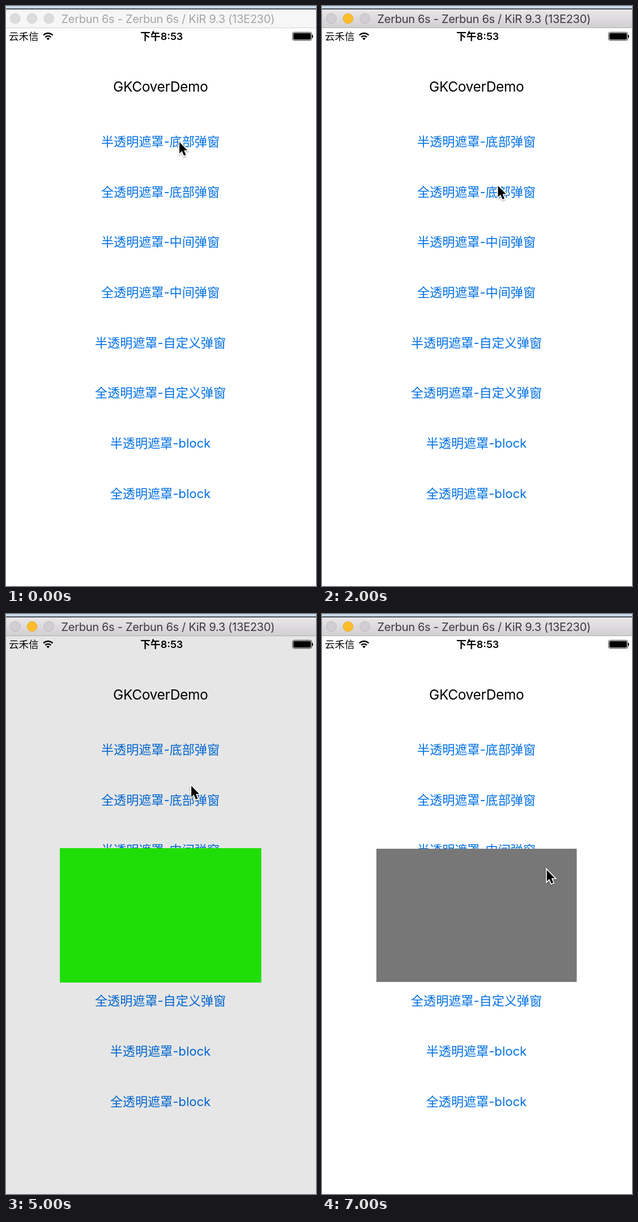
These frames come from a looping animation (547 by 1023 pixels, 8000 ms). An HTML page:

```html
<!DOCTYPE html>
<html lang="zh-CN">
<head>
<meta charset="utf-8">
<title>GKCoverDemo</title>
<style>
  html, body { margin: 0; width: 100%; height: 100%; overflow: hidden; background: #fff; }
  svg { display: block; }
  text { font-family: Inter, "Noto Sans CJK SC", "Noto Sans CJK JP", sans-serif; }
  .links { font-size: 22.1px; fill: #0070e6; text-anchor: middle; }
  .heading { font-size: 24.4px; letter-spacing: -.012em; text-anchor: middle; }
  .status { font-size: 17.5px; }
  .clock { font-size: 17.9px; font-weight: 600; text-anchor: middle; }
  .caption { font-size: 20px; letter-spacing: -.015em; }
</style>
</head>
<body>
<svg width="547" height="1023" viewBox="0 0 547 1023">
  <defs>
    <linearGradient id="chrome" x2="0" y2="1">
      <stop stop-color="#e9e7e9"/><stop offset="1" stop-color="#d1cfd1"/>
    </linearGradient>
    <filter id="shadow" x="-50%" y="-50%" width="200%" height="200%">
      <feDropShadow dx="0" dy="1.5" stdDeviation="1.2" flood-opacity=".35"/>
    </filter>
  </defs>

  <rect width="547" height="1023" fill="#fff"/>
  <g class="status">
    <text x="5" y="60">云禾信</text>
    <text class="clock" x="274.6" y="60">下午8:53</text>
  </g>
  <g fill="none" stroke="#000" stroke-width="2.4">
    <path d="M66 51.5a11.5 11.5 0 0 1 16.4 0M69.2 55a7 7 0 0 1 10 0"/>
    <path d="M74.2 60.3l-2.8-3a4 4 0 0 1 5.6 0z" fill="#000" stroke="none"/>
  </g>
  <rect x="505.5" y="46.3" width="34" height="14.4" rx="3" fill="none" stroke="#000" stroke-width=".8"/>
  <rect x="507" y="47.8" width="31" height="11.4" rx="1.8"/>
  <path d="M540.5 51q2 2.6 0 5.2z" stroke="#000"/>
  <text class="heading" x="272.7" y="151">GKCoverDemo</text>
  <g class="links" id="links"></g>

  <rect id="cover" y="39" width="547" height="984"/>
  <rect id="popup"/>

  <rect width="547" height="5" fill="#c8daec"/>
  <rect y="4.5" width="547" height="1.5" fill="#20262c"/>
  <rect id="bar" y="6" width="547" height="32"/>
  <rect id="edge" y="38" width="547" height="1"/>
  <g id="lights">
    <circle cx="16.3" cy="22" r="8.8"/>
    <circle cx="46" cy="22" r="8.8"/>
    <circle cx="75.7" cy="22" r="8.8"/>
  </g>
  <text class="caption" id="caption" x="97.5" y="29.5">Zerbun 6s - Zerbun 6s / KiR 9.3 (13E230)</text>

  <path id="cursor" d="M0 0V20L4.5 15.8L8 24L11.4 22.6L8 14.4H14Z"
    stroke="#fff" stroke-width="3.2" paint-order="stroke" filter="url(#shadow)"/>
</svg>
<script>
const $ = id => document.getElementById(id);
const set = (node, attrs) => {
  for (const key in attrs) node.setAttribute(key, attrs[key]);
};

const covers = ["半透明遮罩", "全透明遮罩"];
const kinds = ["底部弹窗", "中间弹窗", "自定义弹窗", "block"];
kinds.flatMap(kind => covers.map(cover => `${cover}-${kind}`)).forEach((label, i) => {
  const link = document.createElementNS("http://www.w3.org/2000/svg", "text");
  link.textContent = label;
  set(link, { x: 272.5, y: 247 + 88.65 * i });
  $("links").append(link);
});

const sheet = fill => ({ x: 0, y: 729, width: 547, height: 294, fill });
const dialog = (fill, inset) => ({
  x: 95 + inset, y: 413 + inset, width: 355.5 - 2 * inset, height: 237 - 2 * inset, fill
});
const hidden = { width: 0, height: 0 };

// One scene per second
const scenes = [
  { cursor: [306, 240], dim: 0, popup: hidden },
  { cursor: [331.7, 326.5], dim: .53, popup: sheet("#fb0007") },
  { cursor: [310.5, 317], dim: 0, popup: hidden },
  { cursor: [278, 409.5], dim: 0, popup: hidden, sheet: true, popup: sheet("#777"), cursor: [318, 350] },
  { cursor: [278, 409.5], dim: 0, popup: hidden },
  { cursor: [327, 303], dim: .098, popup: dialog("#1fde07", 0) },
  { cursor: [311, 498], dim: 0, popup: hidden },
  { cursor: [396.7, 451.5], dim: 0, popup: dialog("#777", 1) }
];

function draw() {
  const index = Math.floor(performance.now() / 1000) % scenes.length;
  const { cursor, dim, popup } = scenes[index];
  const active = index > 0;
  set($("cover"), { "fill-opacity": dim });
  set($("popup"), popup);
  set($("cursor"), { transform: `translate(${cursor})` });
  set($("bar"), { fill: active ? "url(#chrome)" : "#f6f6f6" });
  set($("edge"), { fill: active ? "#b1afb1" : "#d2d2d2" });
  set($("caption"), { fill: active ? "#3c3a3c" : "#a5a5a5" });
  const [close, minimize, zoom] = $("lights").children;
  const idle = active ? { fill: "#d0ced0", stroke: "#b9b7b9" } : { fill: "#dcdcdc", stroke: "#d0d0d0" };
  set(close, idle);
  set(minimize, active ? { fill: "#ffbd2e", stroke: "#eaaa30" } : idle);
  set(zoom, idle);
  requestAnimationFrame(draw);
}
draw();
</script>
</body>
</html>
```
